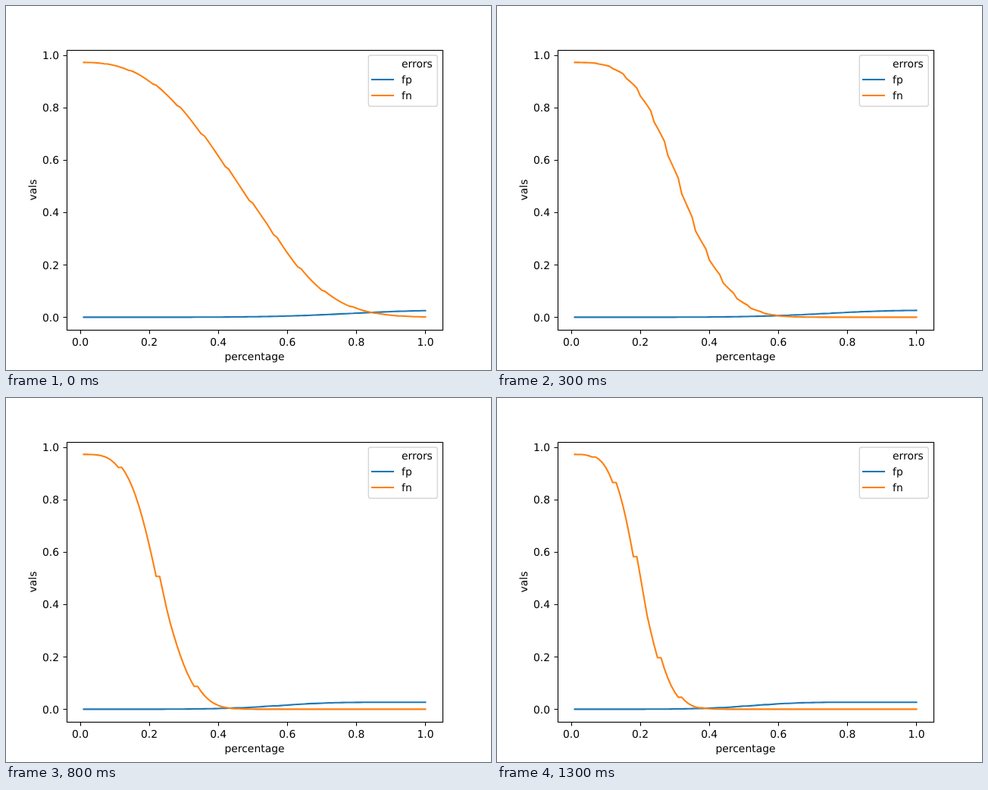
Recreate the animation shown at these times as an HTML page. Size 640 by 480 pixels, loop 1.4 s.

```html
<!DOCTYPE html>
<html lang="en">
<head>
<meta charset="utf-8">
<title>Error rates</title>
<style>
  html, body { margin: 0; width: 100%; height: 100%; overflow: hidden; background: #fff; }
  svg { display: block; width: 640px; height: 480px; }
  text { font: 13.89px "DejaVu Sans", Verdana, sans-serif; fill: #000; text-rendering: geometricPrecision; }
  .mid { text-anchor: middle; }
  .axis { fill: none; stroke: #000; stroke-width: 1.11; }
  .line { fill: none; stroke-width: 2.08; stroke-linejoin: round; stroke-linecap: square; }
  .fp { stroke: #1f77b4; }
  .fn { stroke: #ff7f0e; }
</style>
</head>
<body>
<svg viewBox="0 0 640 480">
  <g id="ticks"></g>
  <path id="fp" class="line fp"/>
  <path id="fn" class="line fn"/>
  <rect class="axis" x="80.5" y="58.5" width="496" height="369"/>
  <text class="mid" x="328" y="467">percentage</text>
  <text class="mid" transform="translate(40 242.5) rotate(-90)">vals</text>
  <rect x="478.3" y="65" width="91" height="67.3" rx="2.8" fill="#fff" fill-opacity=".8" stroke="#ccc" stroke-opacity=".8" stroke-width="1.39"/>
  <text x="522" y="81">errors</text>
  <path class="line fp" d="M483 97H511"/>
  <text x="522" y="102">fp</text>
  <path class="line fn" d="M483 118H511"/>
  <text x="522" y="123">fn</text>
</svg>
<script>
const STEP = 100, LOOP = 1400;
const px = v => 97.99 + v * 455.46;
const py = v => 410.4 - v * 345.68;
const mix = (a, b, u) => a + (b - a) * u;
const $ = id => document.getElementById(id);

let ticks = '';
for (let i = 0; i <= 5; i++) {
  const v = i / 5, label = v.toFixed(1);
  const x = Math.round(px(v)) + .5, y = Math.round(py(v)) + .5;
  ticks += `<path class="axis" d="M${x} 427.5v5M80.5 ${y}h-5"/>` +
    `<text class="mid" x="${px(v)}" y="448">${label}</text>` +
    `<text x="48" y="${Math.round(py(v) + 5.28)}">${label}</text>`;
}
$('ticks').innerHTML = ticks;

// [step, number of bins, fn scale, fp scale]
const keys = [
  [0, 185.9, .541, .82],
  [1, 150, .436, .813],
  [3, 125, .355, .775],
  [5, 107, .283, .674],
  [7, 91.7, .262, .622],
  [10, 90, .232, .586],
  [13, 84, .22, .558]
];

function keyAt(step) {
  const i = Math.max(1, keys.findIndex(k => k[0] >= step));
  const a = keys[i - 1], b = keys[i];
  const u = (step - a[0]) / (b[0] - a[0]);
  return a.map((v, j) => mix(v, b[j], u));
}

// Share left after x, a stretched exponential decay.
const decay = (x, scale, power) => Math.exp(-((x / scale) ** power));

function curves(step) {
  const [, bins, fnScale, fpScale] = keyAt(step);
  const rise = 3.8 - 1.2 * Math.exp(-step / 2);
  const fn = x => .972 * decay(x, fnScale, x < fnScale ? rise : 3.1);
  const fp = x => .0265 * (1 - decay(x, fpScale, 5.3));
  // Whole bins only, which gives the curves their small stairs.
  const path = f => 'M' + Array.from({ length: 100 }, (_, i) => {
    const p = (i + 1) / 100;
    const x = (Math.floor(p * bins + 1e-6) + .5) / bins;
    return px(p).toFixed(2) + ' ' + py(f(x)).toFixed(2);
  }).join('L');
  return { fp: path(fp), fn: path(fn) };
}

let shown = -1;
function draw() {
  const step = Math.floor(performance.now() % LOOP / STEP);
  if (step !== shown) {
    shown = step;
    const paths = curves(step);
    for (const id in paths) $(id).setAttribute('d', paths[id]);
  }
  requestAnimationFrame(draw);
}
draw();
</script>
</body>
</html>
```
